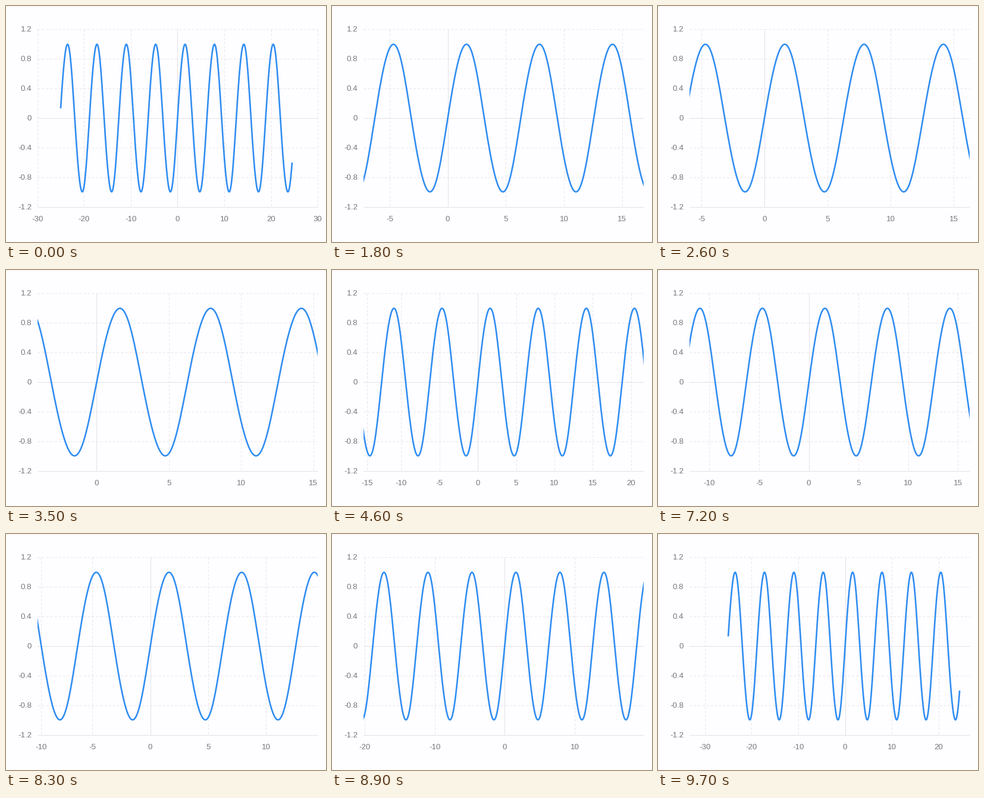
Recreate the animation shown at these times as a matplotlib script. Size 538 by 398 pixels, loop 9.8 s.

```python
import numpy as np
import matplotlib.pyplot as plt
from matplotlib.animation import FuncAnimation
from matplotlib.collections import LineCollection
from matplotlib.patches import Rectangle

W, H, DPI = 538, 398, 100
PX = 72 / DPI
LEFT, RIGHT, TOP, BOTTOM = 52.6, 524.2, 38.9, 339.1
FRAMES, STEP = 98, 100
BACK, GRID, AXIS, TEXT, BLUE = "#fefdff", "#e8e4ea", "#e4e1e6", "#79767c", "#2f8df1"

# turning points of the zoom: time in ms, middle and width of the x range
ZOOM = [(1300, 0, 60), (1800, 4.8, 24.14), (2800, 5.2, 22), (3500, 5.6, 19.42),
        (4600, 3.36, 36.64), (6300, 3.03, 23.92), (7500, 1.9, 29),
        (8300, 2.35, 24.24), (9600, -3.33, 60)]


def view(t):
    """Visible x range at time t, eased between turning points."""
    times, mids, spans = zip(*ZOOM)
    pos = np.interp(t, times, range(len(times)))
    u = pos % 1
    pos += u * u * (3 - 2 * u) - u
    mid, span = (np.interp(pos, range(len(times)), v) for v in (mids, spans))
    return mid - span / 2, mid + span / 2


def to_y(v):
    return (TOP + BOTTOM) / 2 - v * (BOTTOM - TOP) / 2.4


fig = plt.figure(figsize=(W / DPI, H / DPI), dpi=DPI, facecolor=BACK)
ax = fig.add_axes([0, 0, 1, 1])
ax.set(xlim=(0, W), ylim=(H, 0))
ax.axis("off")

font = dict(family="Liberation Sans", size=13.3 * PX, color=TEXT, va="baseline")
ax.plot([0, W], [0.5, 0.5], color="#f7f5f8", lw=PX)
for k in range(-3, 4):
    y = to_y(0.4 * k)
    solid = k in (-3, 0)
    ax.plot([LEFT, RIGHT], [y, y], lw=PX, color=AXIS if solid else GRID,
            ls="-" if solid else (0, (4, 3)), zorder=1)
    ax.text(43.3, y + 4.3, f"{0.4 * k:.1f}" if k else "0", ha="right", **font)

grid = LineCollection([], colors=GRID, linewidths=PX, linestyles=[(0, (4, 3))], zorder=1)
ax.add_collection(grid)
zero, = ax.plot([], [], color=AXIS, lw=PX, zorder=1)
labels = [ax.text(0, 362.7, "", ha="center", **font) for _ in range(12)]

xs = np.arange(-25, 24.51, 0.1)
ys = to_y(0.995 * np.sin(xs - 0.04 * np.sin(xs) ** 2))
curve, = ax.plot([], [], color=BLUE, lw=2.6 * PX, solid_capstyle="butt",
                 solid_joinstyle="round", zorder=3)
curve.set_clip_path(Rectangle((LEFT, 0), RIGHT - LEFT, H, transform=ax.transData))


def ticks(lo, hi):
    gap = 10 if hi - lo > 40 else 5
    for v in range(-40, 41, gap):
        x = LEFT + (v - lo) * (RIGHT - LEFT) / (hi - lo)
        # a tick that has just left stays inside the left edge
        if LEFT - 6 <= x < LEFT - 0.01:
            x = LEFT + 6
        if LEFT - 0.01 <= x <= RIGHT + 0.01:
            yield v, x


def draw(i):
    lo, hi = view(i * STEP)
    curve.set_data(LEFT + (xs - lo) * (RIGHT - LEFT) / (hi - lo), ys)
    marks = list(ticks(lo, hi))
    grid.set_segments([[(x, TOP), (x, BOTTOM)] for v, x in marks if v])
    for label in labels:
        label.set_text("")
    for label, (v, x) in zip(labels, marks):
        label.set_text(str(v))
        label.set_x(x)
        if v == 0:
            zero.set_data([x, x], [TOP, BOTTOM])
    return [curve, grid, zero, *labels]


anim = FuncAnimation(fig, draw, frames=FRAMES, interval=STEP, repeat=True,
                     repeat_delay=0, init_func=lambda: draw(0))
plt.show()
```
